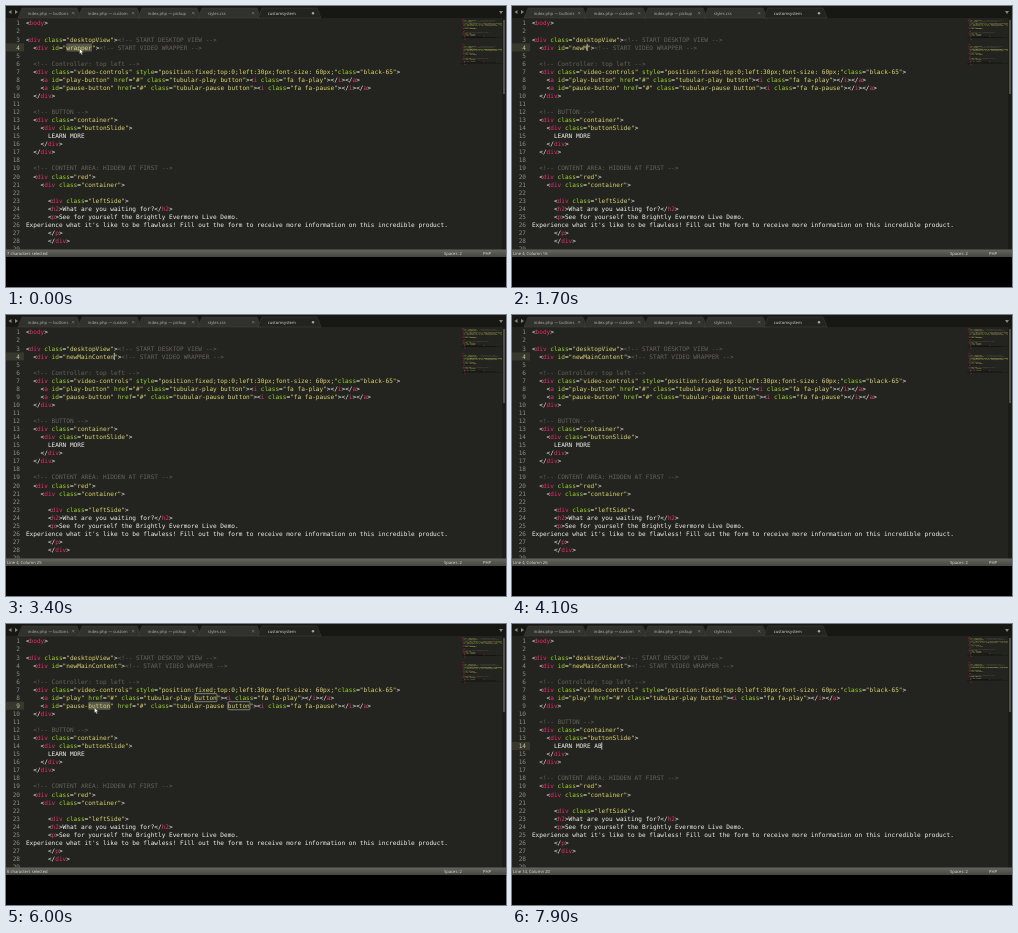
Write an HTML page that moves like this. It is 500x281 px and loops after 8000 ms.

```html
<!DOCTYPE html>
<html lang="en">
<head>
<meta charset="utf-8">
<title>Code editor</title>
<style>
html, body { margin: 0; width: 100%; height: 100%; overflow: hidden; background: #000; }
svg { display: block; width: 100vw; height: 100vh; }
text { white-space: pre; text-rendering: geometricPrecision; }
.code { font: 6.1px "DejaVu Sans Mono", monospace; fill: #f4f4ee; }
.ui { font: 4.15px "Open Sans", "Noto Sans", sans-serif; fill: #b2b3ad; }
.bar { fill: #e2e2dc; }
.tag { fill: #ee2a6e; }
.attr { fill: #a0d830; }
.str { fill: #dfd472; }
.note { fill: #65635a; }
.num { fill: #8b8c85; text-anchor: end; }
</style>
</head>
<body>
<svg id="stage" viewBox="0 0 500 281">
  <defs>
    <linearGradient id="bar" x2="0" y2="1">
      <stop stop-color="#65665f"/><stop offset="1" stop-color="#454640"/>
    </linearGradient>
    <clipPath id="pane"><path d="M0 12H500V243.5H0Z"/></clipPath>
  </defs>
  <path fill="#23241f" d="M0 0H500V251H0Z"/>
  <path fill="#171814" d="M0 0H500V12H0Z"/>
  <g id="tabs"></g>
  <path fill="#858680" d="M5.5 4V8L2.5 6ZM9 4V8L12 6ZM493 5H497L495 8Z"/>
  <g id="editor" clip-path="url(#pane)"></g>
  <path fill="#1b1c18" d="M496 12H500V244H496Z"/>
  <path fill="#50514a" d="M497 14H499V88H497Z"/>
  <path fill="url(#bar)" d="M0 243.5H500V251H0Z"/>
  <g class="ui">
    <text class="bar" id="status" x="1" y="248.8"></text>
    <text class="bar" x="438" y="248.8">Spaces: 2</text>
    <text class="bar" x="477" y="248.8">PHP</text>
  </g>
  <g id="mouse"></g>
</svg>
<script>
const source = `<body>

<div class="desktopView"><!-- START DESKTOP VIEW -->
  <div id="wrapper"><!-- START VIDEO WRAPPER -->

  <!-- Controller: top left -->
  <div class="video-controls" style="position:fixed;top:0;left:30px;font-size: 60px;"class="black-65">
    <a id="play-button" href="#" class="tubular-play button"><i class="fa fa-play"></i></a>
    <a id="pause-button" href="#" class="tubular-pause button"><i class="fa fa-pause"></i></a>
  </div>

  <!-- BUTTON -->
  <div class="container">
    <div class="buttonSlide">
      LEARN MORE
    </div>
  </div>

  <!-- CONTENT AREA: HIDDEN AT FIRST -->
  <div class="red">
    <div class="container">

      <div class="leftSide">
      <h2>What are you waiting for?</h2>
      <p>See for yourself the Brightly Evermore Live Demo.
Experience what it's like to be flawless! Fill out the form to receive more information on this incredible product.
      </p>
      </div>`.split('\n');

const LOOP = 8000, LEFT = 19.9, CHAR = 3.673, TOP = 13.2, ROW = 8.06;
const $ = id => document.getElementById(id);
const colX = c => LEFT + c * CHAR;
const rowY = r => TOP + r * ROW;
const escape = s => s.replace(/&/g, '&amp;').replace(/</g, '&lt;');

// Letters typed so far, given the first keystroke and the pace
const typed = (text, t, start, pace) =>
  text.slice(0, Math.max(0, Math.floor((t - start) / pace) + 1));

function highlight(line) {
  const token = /(<!--.*?-->)|("[^"]*")|((?<=<\/?)\w+)|(\w+(?==))|[^<"\w]+|<\/?|\w+/g;
  return line.replace(token, (s, note, str, tag, attr) => {
    const kind = note ? 'note' : str ? 'str' : tag ? 'tag' : attr ? 'attr' : '';
    return kind ? `<tspan class="${kind}">${escape(s)}</tspan>` : escape(s);
  });
}

// Document, caret and selection at time t
function editorAt(t) {
  const lines = [...source];
  let row = 3, col = 18, size = 0, since = 0;
  const place = (r, c, time, n = 0) => { row = r; col = c; since = time; size = n; };

  if (t < 1000) place(3, 11, 0, 7);
  else {
    const name = typed('newMainContent', t, 1000, 190);
    lines[3] = lines[3].replace('wrapper', name);
    place(3, 11 + name.length, Math.min(t, 3470));
  }
  if (t >= 4700) place(7, 16, 4700, 6);
  if (t >= 5100) {
    const dash = t < 5300 ? '-' : '';
    lines[7] = lines[7].replace('play-button', 'play' + dash);
    place(7, 15 + dash.length, 5100);
  }
  if (t >= 5700) place(8, 17, 5700, 6);
  if (t >= 6400) {
    lines.splice(8, 1);
    place(8, 2, 6400);
  }
  if (t >= 6900) {
    const more = typed(' AB', t, 7400, 200);
    lines[13] += more;
    place(13, 16 + more.length, more ? t : 6900);
  }
  return { lines, row, col, size, blink: (t - since) % 1060 < 530 };
}

const path = [[0, 73.5, 42.5], [4200, 73.5, 42.5], [4600, 88.4, 76], [5300, 88.4, 76],
  [5600, 88.4, 83.5], [6400, 88.4, 83.5], [6800, 88.4, 121], [LOOP, 88.4, 121]];

function mouseAt(t) {
  const i = path.findIndex(p => p[0] > t);
  const [a, b] = [path[i - 1], path[i]];
  const u = (t - a[0]) / (b[0] - a[0]), ease = u * u * (3 - 2 * u);
  return [1, 2].map(k => a[k] + (b[k] - a[k]) * ease);
}

// The pointer hides from the first keystroke until it moves again
const pointerHidden = t => t >= 1000 && t < 4200 || t >= 7400;

function draw(t) {
  const { lines, row, col, size, blink } = editorAt(t);
  const box = (r, c, n, style) =>
    `<rect x="${colX(c)}" y="${rowY(r)}" width="${n * CHAR}" height="${ROW}" rx=".8" ${style}/>`;
  let marks = `<rect y="${rowY(row)}" width="18" height="${ROW}" fill="#37382e"/>`;

  if (size) {
    const word = lines[row].substr(col, size);
    lines.forEach((line, r) => {
      for (const m of line.matchAll(new RegExp(`\\b${word}\\b`, 'g')))
        if (r !== row || m.index !== col)
          marks += box(r, m.index, size, 'fill="none" stroke="#b9b9a8" stroke-width=".6"');
    });
    marks += box(row, col, size, 'fill="#57584c"');
  } else if (blink) {
    marks += `<rect x="${colX(col) - .2}" y="${rowY(row) + .4}" width=".7" height="7.2" fill="#f8f8f0"/>`;
  }

  const code = lines.map((line, r) =>
    `<text x="${LEFT}" y="${rowY(r) + 6.2}">${highlight(line)}</text>`).join('');
  const numbers = Array.from({ length: 29 }, (_, r) =>
    `<text class="num" x="14" y="${rowY(r) + 6.2}"${r === row ? ' style="fill:#c9c6a0"' : ''}>${r + 1}</text>`).join('');
  const map = y => `<use href="#code" transform="translate(453.2 ${y}) scale(.092)"/>`;

  $('editor').innerHTML = marks + `<g class="code">${numbers}<g id="code">${code}</g></g>` + map(12) + map(37.5);
  $('status').textContent = size ? size + ' characters selected' : `Line ${row + 1}, Column ${col + 1}`;

  $('mouse').setAttribute('transform', `translate(${mouseAt(t)})`);
  $('mouse').setAttribute('visibility', pointerHidden(t) ? 'hidden' : 'visible');
  $('mouse').innerHTML = size
    ? '<path d="M0 0V5.6L1.3 4.4 2.2 6.5 3.1 6.1 2.2 4.1H4Z" fill="#fff" stroke="#222" stroke-width=".4"/>'
    : '<path d="M-1.2-2.8H1.2M0-2.8V2.8M-1.2 2.8H1.2" fill="none" stroke="#b5b5ae" stroke-width=".5"/>';
}

$('tabs').innerHTML = ['index.php — buttons', 'index.php — custom', 'index.php — pickup',
  'styles.css', 'customsystem'].map((name, i) => {
  const x = 14 + i * 60, active = i === 4;
  return `<path d="M${x - 2} 12L${x + 2} 2H${x + 57}L${x + 61} 12Z" fill="${active ? '#23241f' : '#31322d'}"
      stroke="#4a4b45" stroke-width=".4"/>
    <text class="ui" x="${x + 7.8}" y="8.5"${active ? ' style="fill:#dcdcd4"' : ''}>${name}</text>` +
    (active ? `<circle cx="${x + 53}" cy="7.2" r="1.2" fill="#a5a69f"/>`
      : `<path d="M${x + 52} 6l2.4 2.4m0-2.4l-2.4 2.4" stroke="#80817a" stroke-width=".6"/>`);
}).join('');

let shown = -1;
function tick() {
  const t = Math.floor(performance.now() % LOOP / 100) * 100;
  if (t !== shown) draw(shown = t);
  requestAnimationFrame(tick);
}
tick();
</script>
</body>
</html>
```
